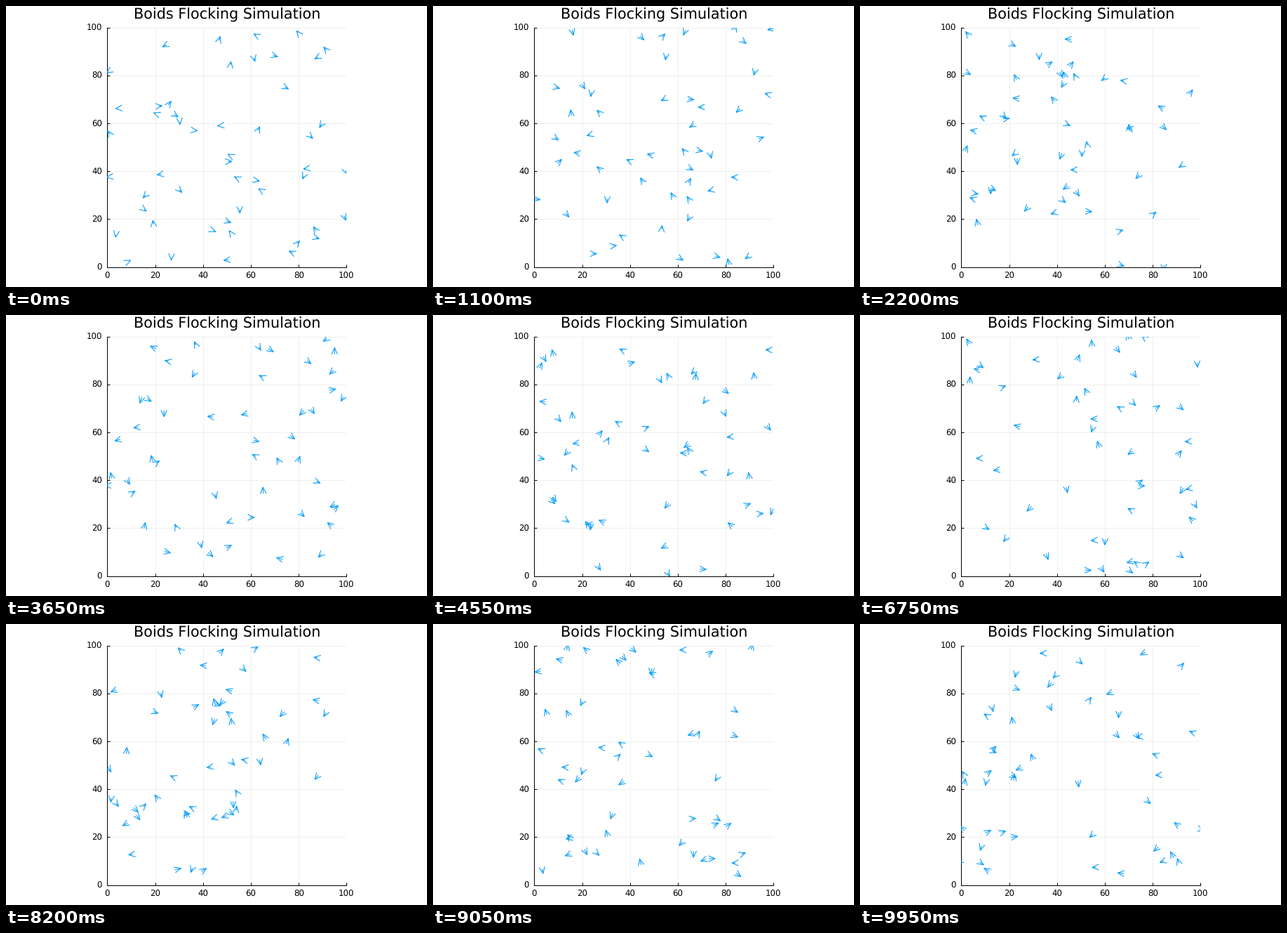
These frames come from a looping animation (600x400 px, 10000 ms). A matplotlib script:

```python
import numpy as np
import matplotlib.pyplot as plt
from matplotlib.animation import FuncAnimation
from matplotlib.collections import LineCollection

W, H, DPI = 600, 400, 100
FRAMES, INTERVAL = 200, 50
LEFT, RIGHT, TOP, BOTTOM = 144.4, 485.4, 30.6, 371.6
SIDE, BOIDS = 100, 50
PX = 72 / DPI            # one pixel in points
BLUE = "#009AFA"
ARM, SPREAD = 3.0, np.radians(24)

plt.rcParams["font.family"] = "DejaVu Sans"
plt.rcParams["text.hinting"] = "none"


def wrap(z):
    return z.real % SIDE + 1j * (z.imag % SIDE)


def offsets(pos):
    """Shortest step from each boid to every other one on the torus."""
    half = SIDE * (0.5 + 0.5j)
    return wrap(pos[None, :] - pos[:, None] + half) - half


def steer(pos, vel, cruise, rng):
    """Keep apart from close neighbours, wander, ease towards cruising speed."""
    gap = offsets(pos)
    dist = np.abs(gap) + SIDE * np.eye(BOIDS)
    apart = -((dist < 4) * gap / np.maximum(dist, 0.5) ** 2).sum(1)
    vel = vel + 0.1 * apart
    speed = np.abs(vel)
    turn = np.exp(1j * rng.normal(0, 0.04, BOIDS))
    return vel / speed * (speed + 0.06 * (cruise - speed)) * turn


def simulate():
    rng = np.random.default_rng(7)
    pos = rng.uniform(0, SIDE, BOIDS) + 1j * rng.uniform(0, SIDE, BOIDS)
    heading = rng.uniform(0, 2 * np.pi, BOIDS)
    vel = rng.uniform(0.6, 2.2, BOIDS) * np.exp(1j * heading)
    cruise = rng.uniform(1.5, 2.8, BOIDS)
    states = []
    for _ in range(FRAMES):
        states.append((pos, vel))
        vel = steer(pos, vel, cruise, rng)
        pos = wrap(pos + vel)
    return states


def points(*zs):
    return np.stack([np.column_stack([z.real, z.imag]) for z in zs], axis=1)


def arrows(pos, vel):
    tip = pos + vel
    back = -ARM * vel / np.abs(vel)
    left, right = (tip + back * np.exp(1j * a) for a in (SPREAD, -SPREAD))
    return list(points(pos, tip)) + list(points(left, tip, right))


def label(x, y, text, size, ha):
    fig.text(x / W, 1 - y / H, text, fontsize=size * PX, ha=ha, va="baseline")


fig = plt.figure(figsize=(W / DPI, H / DPI), dpi=DPI, facecolor="white")
ax = fig.add_axes([LEFT / W, 1 - BOTTOM / H, (RIGHT - LEFT) / W, (BOTTOM - TOP) / H])
ax.set(xlim=(0, SIDE), ylim=(0, SIDE))
ticks = range(0, SIDE + 1, 20)
ax.set_xticks(ticks)
ax.set_yticks(ticks)
ax.tick_params(direction="in", length=4 * PX, width=PX,
               labelleft=False, labelbottom=False)
ax.grid(color="black", alpha=0.1, linewidth=0.6 * PX)
ax.set_axisbelow(True)
for name, spine in ax.spines.items():
    spine.set_visible(name in ("left", "bottom"))
    spine.set_linewidth(PX)

label((LEFT + RIGHT) / 2, 18.5, "Boids Flocking Simulation", 20.8, "center")
for t in ticks:
    step = t / SIDE
    label(LEFT + step * (RIGHT - LEFT), 387.5, str(t), 11.8, "center")
    label(137, BOTTOM - step * (BOTTOM - TOP) + 4.5, str(t), 11.8, "right")

flock = LineCollection([], colors=BLUE, linewidths=1.05 * PX, zorder=3)
ax.add_collection(flock, autolim=False)
states = simulate()


def draw(i):
    flock.set_segments(arrows(*states[i]))
    return [flock]


anim = FuncAnimation(fig, draw, frames=FRAMES, interval=INTERVAL,
                     repeat=True, repeat_delay=0)
plt.show()
```
